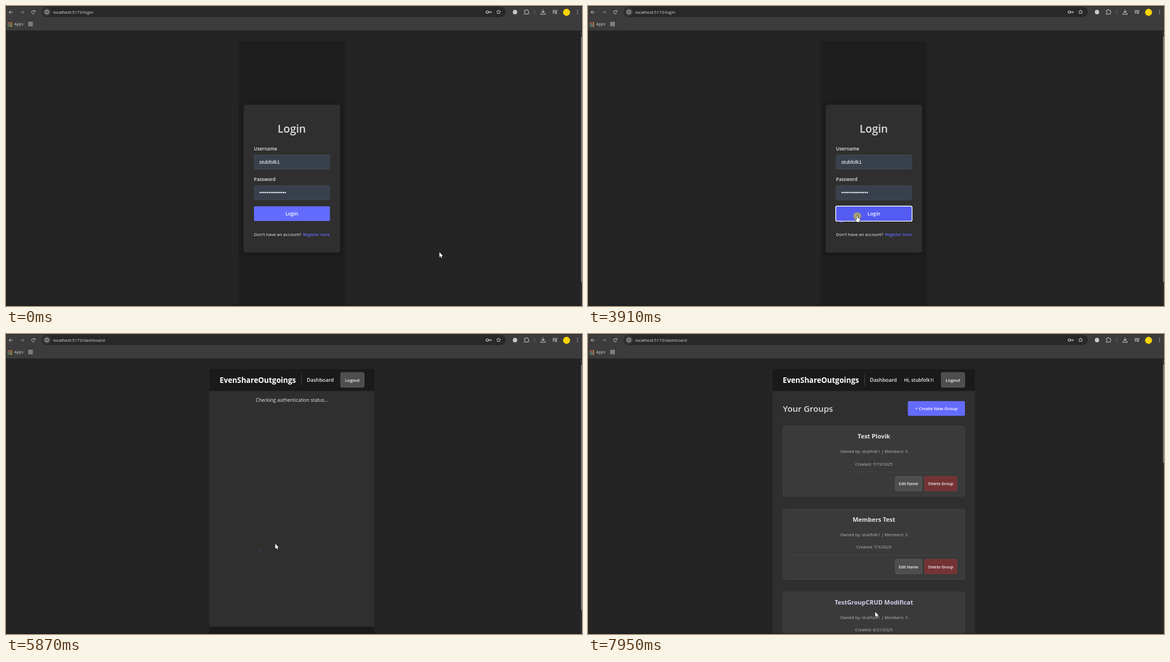
Recreate the animation shown at these times as an HTML page with a canvas. Size 1036x540 px, loop 8 s.

```html
<!DOCTYPE html>
<html lang="en">
<head>
<meta charset="utf-8">
<title>Group expenses login</title>
<style>
html, body { margin: 0; width: 100%; height: 100%; overflow: hidden; background: #242424; }
canvas { display: block; }
</style>
</head>
<body>
<canvas id="stage" width="1036" height="540"></canvas>
<script>
const ctx = document.getElementById('stage').getContext('2d');
const LOOP = 8000, STEP = 69, TAU = Math.PI * 2;
const SANS = '"Open Sans", "Noto Sans", sans-serif';
const ARIAL = '"Liberation Sans", sans-serif';
const USER = 'stubfolk1', BRAND = 'EvenShareOutgoings';
const ACCENT = '#646cff', ICON = '#c7c7c7';

// start and last change of each burst of motion
const BURSTS = [[0, 0], [70, 208], [470, 1229], [2170, 2239], [3910, 4690],
  [4760, 5530], [5600, 5940], [6340, 7100], [7190, 7949]];

// pointer: time, x, y
const PATH = [
  [0, 779.5, 443], [69, 779.5, 443], [70, 735, 438], [139, 650, 440], [208, 576, 448],
  [469, 576, 448], [470, 550, 440], [608, 478, 414], [746, 430, 400], [815, 421, 394],
  [884, 432, 389], [1022, 456, 382], [1229, 482.5, 378], [2169, 482.5, 378],
  [2239, 484.3, 377.5], [6339, 484.3, 377.5], [6340, 478, 330], [6409, 468, 250],
  [6547, 453, 191], [6685, 530, 179], [6823, 632, 270], [6961, 545, 460],
  [7030, 470, 500], [7099, 418, 470], [7190, 385, 400], [7259, 367, 300],
  [7397, 470, 171], [7535, 680, 235], [7604, 723, 330], [7742, 640, 460],
  [7880, 545, 498], [7949, 516.5, 500]
];

const ARROW = new Path2D('M0 0V9.2L2.1 7.3L3.5 10.4L5 9.8L3.6 6.7H6.5Z');
const HAND = new Path2D('M-.9 .7Q-.9 -.3 0 -.3Q.9 -.3 .9 .7V4.2L3.9 5Q4.9 5.3 4.8 6.4L4.3 9.4L3.6 11.3H-.9L-3.2 7.4Q-3.4 6.3 -2.3 6.4L-.9 7.5Z');

function txt(s, x, y, size, weight, color, align = 'left', family = SANS) {
  ctx.font = `${weight} ${size}px ${family}`;
  ctx.textAlign = align;
  ctx.fillStyle = color;
  ctx.fillText(s, x, y + size * 0.357);
}

function rect(x, y, w, h, fill) {
  ctx.fillStyle = fill;
  ctx.fillRect(x, y, w, h);
}

function box(x, y, w, h, r, fill, line, width = 0.7) {
  ctx.beginPath();
  ctx.roundRect(x, y, w, h, r);
  if (fill) { ctx.fillStyle = fill; ctx.fill(); }
  if (line) { ctx.strokeStyle = line; ctx.lineWidth = width; ctx.stroke(); }
}

function disc(x, y, r, fill) {
  ctx.beginPath();
  ctx.arc(x, y, r, 0, TAU);
  ctx.fillStyle = fill;
  ctx.fill();
}

function ring(x, y, r, color, width, from = 0, to = TAU) {
  ctx.beginPath();
  ctx.arc(x, y, r, from, to);
  ctx.strokeStyle = color;
  ctx.lineWidth = width;
  ctx.stroke();
}

function line(d, color = ICON, width = 1) {
  ctx.strokeStyle = color;
  ctx.lineWidth = width;
  ctx.stroke(new Path2D(d));
}

function stepTime(t) {
  const [start, end] = BURSTS.filter(b => b[0] <= t).pop();
  return Math.min(start + Math.floor((t - start) / STEP) * STEP, end);
}

function pointer(t) {
  const i = PATH.findIndex(p => p[0] > t);
  if (i < 0) return PATH[PATH.length - 1].slice(1);
  const [t0, x0, y0] = PATH[i - 1], [t1, x1, y1] = PATH[i];
  const k = (t - t0) / (t1 - t0);
  return [x0 + (x1 - x0) * k, y0 + (y1 - y0) * k];
}

function browser(page, thumb) {
  rect(0, 0, 1036, 44, '#3c3c3c');
  rect(0, 0, 1036, 1, '#2a2a2a');
  box(64, 1.5, 835, 18.5, 9.2, '#282828');
  line('M12 11.2H5.6M8.4 8.2L5.4 11.2L8.4 14.2');
  line('M25.5 11.2H32M29.2 8.2L32.2 11.2L29.2 14.2', '#858585');
  ring(49, 11.2, 2.9, ICON, 1, 0.5, 5.4);
  line('M52.2 7.6V10.2H49.6');
  disc(73.5, 10.8, 7.2, '#3c3c3c');
  ring(73.5, 10.8, 3.5, '#dedede', 0.9);
  rect(73, 10.3, 1, 2.5, '#dedede');
  rect(73, 8.7, 1, 1, '#dedede');
  txt('localhost:', 85, 10.9, 7.67, 400, '#e8e8e8');
  const hostEnd = 85 + ctx.measureText('localhost:').width;
  txt('5173/' + page, hostEnd, 10.9, 7.67, 400, '#d2d2d2');

  ring(865.6, 10.9, 2.2, ICON, 1.1);
  line('M867.8 10.1H873V12H871.5V13M867.8 11.8H870', ICON, 1);
  line('M886 6.8L887.1 9.3L889.8 9.6L887.8 11.4L888.4 14L886 12.6L883.6 14L884.2 11.4L882.2 9.6L884.9 9.3Z', ICON, 0.9);
  disc(915.5, 11, 3.9, '#c9c9c9');
  line('M932.3 8H934.6Q934.6 6.3 936 6.3Q937.4 6.3 937.4 8H939.4V10Q940.8 10 940.8 11.3Q940.8 12.6 939.4 12.6V14.6H932.3V12.6Q934 12.4 934 11.2Q934 10 932.3 9.9Z', ICON, 1);
  rect(950.6, 6.5, 0.8, 9, '#686868');
  line('M966 6.5V12M963.4 9.6L966 12.2L968.6 9.6M962.2 12.6V15H969.8V12.6', ICON, 1.1);
  line('M983 8.2H989M983 10.4H989M983 12.6H986.5M990 13V8H992', ICON, 1);
  disc(989, 13.1, 1.3, ICON);
  disc(1008.2, 11.4, 6.3, '#fbd404');
  for (let i = -1; i < 2; i++) disc(1028, 11.2 + i * 2.9, 0.8, ICON);

  const dots = ['#e8665a', '#e8665a', '#f0b43c', '#57a56b', '#6d94e8', '#f0b43c', '#57a56b', '#e8a43c', '#f0b43c'];
  dots.forEach((c, i) => rect(3.2 + i % 3 * 2.9, 29.4 + Math.floor(i / 3) * 2.9, 1.9, 1.9, c));
  txt('Apps', 15, 32.2, 6.8, 400, '#d6d6d6');
  for (let i = 0; i < 4; i++) box(40.7 + i % 2 * 4.2, 29 + (i >> 1) * 4.2, 2.7, 2.7, 0.3, null, ICON, 0.9);

  rect(1033, 44, 3, 496, '#2b2b2b');
  box(1034.5, 55, 3, thumb, 1, '#8c8c8c');
  line('M1034 50.3L1036 48.3', '#8c8c8c', 1);
}

function loginPage(t, hover, pressed, loading) {
  const up = loading ? 2.4 : 0;
  rect(418, 63, 191, 477, '#1e1e1e');
  ctx.save();
  ctx.shadowColor = 'rgba(0,0,0,.35)';
  ctx.shadowBlur = 9;
  ctx.shadowOffsetY = 2;
  box(427.3, 177.8 - up, 173.7, 266.3 + up * 2, 4.5, '#2f2f2f');
  ctx.restore();
  txt('Login', 514, 221 - up, 19.4, 600, '#dedede', 'center');
  [['Username', USER, 256.7], ['Password', '•'.repeat(15), 312.2]].forEach(([label, value, y]) => {
    txt(label, 446, y - up, 8.4, 600, '#e6e6e6');
    box(446.2, y + 11.2 - up, 136.2, 25.6, 2.2, '#38404c', '#4c5159');
    txt(value, 455.5, y + 23.9 - up, 9.24, 400, '#fff', 'left', ARIAL);
  });

  if (t >= 1022) {
    if (t < 3910) disc(456, 384.6, 5.8, '#40429a');
    else box(453, 387, 6, 3.1, 1.2, '#4547a0');
  }
  if (loading) {
    box(446, 358.3, 136.6, 31, 2.2, '#3a3a3a');
    const mid = Math.PI + TAU * (t - 4760) / 1000;
    ring(514.2, 373.8, 7.8, '#6b6b6b', 1.7);
    ring(514.2, 373.8, 7.8, '#ededed', 1.7, mid - 0.8, mid + 0.8);
  } else {
    box(446, 360.5, 136.6, 26.6, 2.2, hover ? '#535bf2' : ACCENT);
    if (pressed) box(445.6, 360.2, 137.2, 27.2, 2.4, null, '#fff', 1.4);
    txt('Login', 514.2, 374, 8.7, 600, '#fff', 'center');
  }
  txt("Don't have an account?", 446, 411.3 + up, 7.86, 400, '#f4f4f4');
  txt('Register here', 582.5, 411.3 + up, 7.6, 600, ACCENT, 'right');
}

function navBar(x, w, user) {
  rect(x, 63, w, 39.5, '#1a1a1a');
  const right = x + w - 18.3;
  txt(BRAND, x + 18.2, 83.5, 13.3, 700, '#fff');
  rect(x + 165.2, 72, 0.8, 20.5, '#484848');
  txt('Dashboard', x + 175, 83, 9.2, 600, '#ececec');
  if (user) txt(`Hi, ${USER}!`, x + 236.5, 83, 8.4, 600, '#ececec');
  box(right - 42.3, 69.2, 42.3, 26.8, 2.3, '#4e4e4e', '#686868');
  txt('Logout', right - 21.2, 82.8, 7.9, 600, '#f4f4f4', 'center');
}

function checkingPage() {
  rect(366, 63, 296.5, 477, '#2f2f2f');
  navBar(366, 296.5, false);
  txt('Checking authentication status...', 514.2, 118.8, 8.59, 400, '#ececec', 'center');
  rect(366, 527, 296.5, 13, '#1b1b1b');
  rect(453, 389.2, 6, 1, '#4a4a8c');
}

function groupCard(y, name, members, date, px, py) {
  box(350.8, y, 326.8, 126.4, 4, '#3a3a3a', '#4a4a4a');
  ctx.font = `700 10.95px ${SANS}`;
  const half = ctx.measureText(name).width / 2;
  const hover = Math.abs(px - 514) < half && Math.abs(py - y - 18.6) < 18;
  txt(name, 514.2, y + 18.6, 10.95, 700, hover ? '#d2d0ec' : '#e6e6e6', 'center');
  txt(`Owned by: ${USER} | Members: ${members}`, 514.2, y + 46, 7.5, 400, '#b8b8b8', 'center');
  txt('Created: ' + date, 514.2, y + 68.2, 7.55, 400, '#b8b8b8', 'center');
  ctx.setLineDash([1.6, 1]);
  line(`M364 ${y + 82.8}H664`, '#525252', 0.8);
  ctx.setLineDash([]);
  box(552.8, y + 90.5, 48, 26.2, 2.2, '#4e4e4e', '#626262');
  txt('Edit Name', 576.6, y + 104, 7, 600, '#f4f4f4', 'center');
  box(605.3, y + 90.5, 58.2, 26.2, 2.2, '#743335', '#8c3c3c');
  txt('Delete Group', 634.4, y + 104, 7, 600, '#f4f4f4', 'center');
}

function groupsPage(px, py) {
  rect(332, 63, 364, 477, '#2f2f2f');
  navBar(332, 364, true);
  txt('Your Groups', 350.5, 135, 15.1, 600, '#dedede');
  box(575.3, 120.8, 102.7, 26.4, 2.2, ACCENT);
  txt('+ Create New Group', 626.6, 133.9, 7.9, 600, '#fff', 'center');
  [['Test Plovik', 3, '7/19/2025'], ['Members Test', 2, '7/3/2025'], ['TestGroupCRUD Modificat', 3, '6/21/2025']]
    .forEach((g, i) => groupCard(165.8 + i * 149.3, ...g, px, py));
}

function drawPointer(x, y, kind) {
  if (kind === 'blocked') {
    disc(483.2, 377.2, 4.5, '#fff');
    ring(483.2, 377.2, 3.2, '#c8202a', 1.5);
    line('M481 375L485.4 379.4', '#c8202a', 1.5);
    return;
  }
  const shape = kind === 'hand' ? HAND : ARROW;
  ctx.save();
  ctx.translate(x, y);
  ctx.lineJoin = 'round';
  ctx.strokeStyle = '#111';
  ctx.lineWidth = 1.2;
  ctx.stroke(shape);
  ctx.fillStyle = '#fff';
  ctx.fill(shape);
  ctx.restore();
}

function draw(time) {
  const t = stepTime(time);
  const [x, y] = pointer(t);
  const onLogin = t < 5600, listed = time >= 5940;
  const pressed = t >= 3910, loading = onLogin && t >= 4048;
  const hover = onLogin && x > 446 && x < 582 && y > 360 && y < 387;

  rect(0, 0, 1036, 540, '#242424');
  if (onLogin) loginPage(t, hover, pressed, loading);
  else if (listed) groupsPage(x, y);
  else checkingPage();
  browser(onLogin ? 'login' : 'dashboard', listed ? 177 : 442);
  rect(0, 538.4, 1033, 1.6, 'rgba(20,20,20,.55)');

  if (pressed && onLogin && !loading) disc(484.3, 378.2, 7, 'rgba(215,200,45,.62)');
  drawPointer(x, y, loading ? 'blocked' : hover ? 'hand' : 'arrow');
}

const begin = performance.now();
function tick() {
  draw((performance.now() - begin) % LOOP);
  requestAnimationFrame(tick);
}
tick();
</script>
</body>
</html>
```
